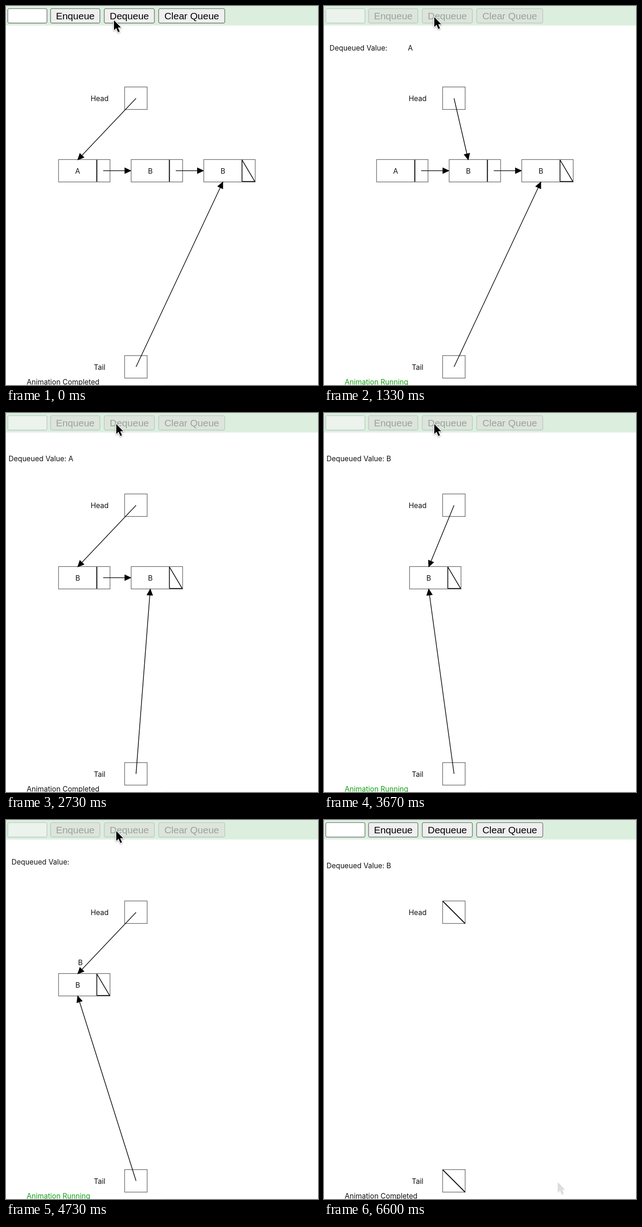
An HTML page with a canvas that plays this animation: 679x825 px, repeating every 6.73 s.

```html
<!DOCTYPE html>
<html lang="en">
<head>
<meta charset="utf-8">
<title>Linked list queue</title>
<style>
html, body { margin: 0; width: 100%; height: 100%; overflow: hidden; background: #fff; }
canvas { display: block; }
</style>
</head>
<body>
<canvas id="stage" width="679" height="825"></canvas>
<script>
const LOOP = 6730, TICK = 1000 / 15;
const ctx = document.getElementById('stage').getContext('2d');
const SANS = 'Inter, "Noto Sans", sans-serif';
const ARIAL = '"Liberation Sans", Arial, sans-serif';
const INK = '#111', EDGE = '#6c6c6c';
const GAP = 158, LEFT = 114, TOP = 334, BOTTOM = 383, CENTER = 42;

// Stepped tracks: [tick, value], each value holds until the next entry.
const ENABLED = [[0, 1], [12, 0], [33, 1], [41, 0], [59, 1], [64, 0], [79, 1]];
const RUNNING = [[0, 0], [13, 1], [33, 0], [42, 1], [59, 0], [71, 1], [79, 0]];
const LABEL = [[0, null], [13, ''], [22, 'A'], [42, ''], [50, 'B'], [71, ''], [79, 'B']];
const NODES = [[0, 'ABB'], [22, 'BB'], [50, 'B'], [79, '']];
const HEAD = [[0, 0], [20, 1], [22, 0], [47, 1], [50, 0], [76, -1]];
const SLIDE = [[0, 0], [22, 5], [27, 4], [28, 3], [29, 2], [30, 1], [32, 0],
  [50, 4.5], [54, 3.5], [55, 2.5], [56, 1.5], [57, 0.5], [58, 0]];
// When each lifted letter leaves its node.
const LIFT = [[0, 13], [42, 41], [71, 70]];

const at = (track, k) => track.filter(s => s[0] <= k).pop()[1];
const clamp = v => Math.max(0, Math.min(1, v));
const mix = (a, b, p) => a + (b - a) * p;

function line(x1, y1, x2, y2, width = 1.6, color = INK) {
  ctx.strokeStyle = color;
  ctx.lineWidth = width;
  ctx.beginPath();
  ctx.moveTo(x1, y1);
  ctx.lineTo(x2, y2);
  ctx.stroke();
}

function frame(x, y, w, h) {
  ctx.strokeStyle = EDGE;
  ctx.lineWidth = 1.4;
  ctx.strokeRect(x, y, w, h);
}

function text(str, x, y, align = 'left', color = INK, font = '15.6px ' + SANS) {
  ctx.font = font;
  ctx.textAlign = align;
  ctx.fillStyle = color;
  ctx.fillText(str, x, y);
}

function arrow(x1, y1, x2, y2) {
  line(x1, y1, x2, y2);
  ctx.save();
  ctx.translate(x2, y2);
  ctx.rotate(Math.atan2(y2 - y1, x2 - x1));
  ctx.fillStyle = '#000';
  ctx.beginPath();
  ctx.moveTo(1, 0);
  ctx.lineTo(-14, -7);
  ctx.lineTo(-14, 7);
  ctx.fill();
  ctx.restore();
}

function control(x, w, label, on) {
  ctx.beginPath();
  ctx.roundRect(x, 5.6, w, 31.6, 3.5);
  ctx.fillStyle = label ? (on ? '#efefef' : '#dce4dc') : (on ? '#fff' : '#ebf3ec');
  ctx.fill();
  ctx.strokeStyle = on ? '#707070' : '#bcc7be';
  ctx.lineWidth = 1.4;
  ctx.stroke();
  if (label) text(label, x + w / 2, 28.5, 'center', on ? '#000' : '#99a39b', '21px ' + ARIAL);
}

function toolbar(on) {
  ctx.fillStyle = '#dcefdf';
  ctx.fillRect(0, 0, 679, 42.5);
  control(3.8, 85.4, '', on);
  control(97, 107.4, 'Enqueue', on);
  control(213.8, 109.2, 'Dequeue', on);
  control(332.2, 144, 'Clear Queue', on);
}

function pointerBox(name, y, isNull) {
  text(name, 203.7, y + 31, 'center');
  frame(258.2, y, 49, 49);
  if (isNull) line(258.5, y + 0.5, 307, y + 49, 2.2);
}

function node(x, letter, last) {
  frame(x + 0.4, TOP + 0.3, 112, 48.7);
  text(letter, x + CENTER, 365, 'center');
  const d = x + 83.6;
  if (last) {
    line(d, TOP + 1, d, BOTTOM - 1, 1.8);
    line(d, TOP + 1, x + 111.5, BOTTOM - 1);
    line(d, BOTTOM - 1, x + 112, BOTTOM - 1, 1.8);
  } else {
    line(d, TOP + 1, d, BOTTOM - 0.5, 2.2);
    arrow(x + 97.5, 358.5, x + GAP, 358.5);
  }
}

function list(k) {
  const letters = at(NODES, k), head = at(HEAD, k);
  const start = LEFT + at(SLIDE, k) * GAP / 5.5;
  const mid = i => start + i * GAP + CENTER;
  [...letters].forEach((c, i) => node(start + i * GAP, c, i === letters.length - 1));
  pointerBox('Head', 176.3, head < 0);
  pointerBox('Tail', 761, head < 0);
  if (head < 0) return;
  arrow(283, 201, mid(head), TOP + 1);
  arrow(283, 785.5, mid(letters.length - 1), BOTTOM);
}

function labels(k) {
  const value = at(LABEL, k);
  if (value) text('Dequeued Value: ' + value, 5.5, 104.5);
  if (value === '') {
    const p = clamp((k - at(LIFT, k)) / 5.5);
    text('Dequeued Value:', 12, 96.5);
    text(at(NODES, k)[0], mix(156, 188, p), mix(365, 96.5, p), 'center');
  }
  if (at(RUNNING, k)) text('Animation Running', 45, 823.5, 'left', '#12a012');
  else text('Animation Completed', 45, 823.5);
}

function cursor(k) {
  const near = clamp(k / 4), away = 1 - (1 - clamp((k - 93) / 5)) ** 2;
  ctx.save();
  ctx.translate(mix(mix(235, 240, near), 509, away), mix(mix(31, 24, near), 789, away));
  ctx.globalAlpha = k < 99 ? 1 : 0.12;
  const shape = new Path2D('M0 0V21.5L5 17L8.8 26L12.4 24.5L8.6 15.8H15.2Z');
  ctx.lineJoin = 'round';
  ctx.lineWidth = 3;
  ctx.strokeStyle = '#fff';
  ctx.shadowColor = 'rgba(0,0,0,.4)';
  ctx.shadowBlur = 3;
  ctx.shadowOffsetY = 1;
  ctx.stroke(shape);
  ctx.shadowColor = 'transparent';
  ctx.fillStyle = '#000';
  ctx.fill(shape);
  ctx.restore();
}

function draw(ms) {
  const k = Math.floor((ms + 4) / TICK);
  ctx.fillStyle = '#fff';
  ctx.fillRect(0, 0, 679, 825);
  ctx.fillStyle = '#fafafa';
  ctx.fillRect(345, 823, 334, 2);
  toolbar(at(ENABLED, k));
  list(k);
  labels(k);
  cursor(k);
}

const t0 = performance.now();
function tick() {
  draw((performance.now() - t0) % LOOP);
  requestAnimationFrame(tick);
}
tick();
</script>
</body>
</html>
```
